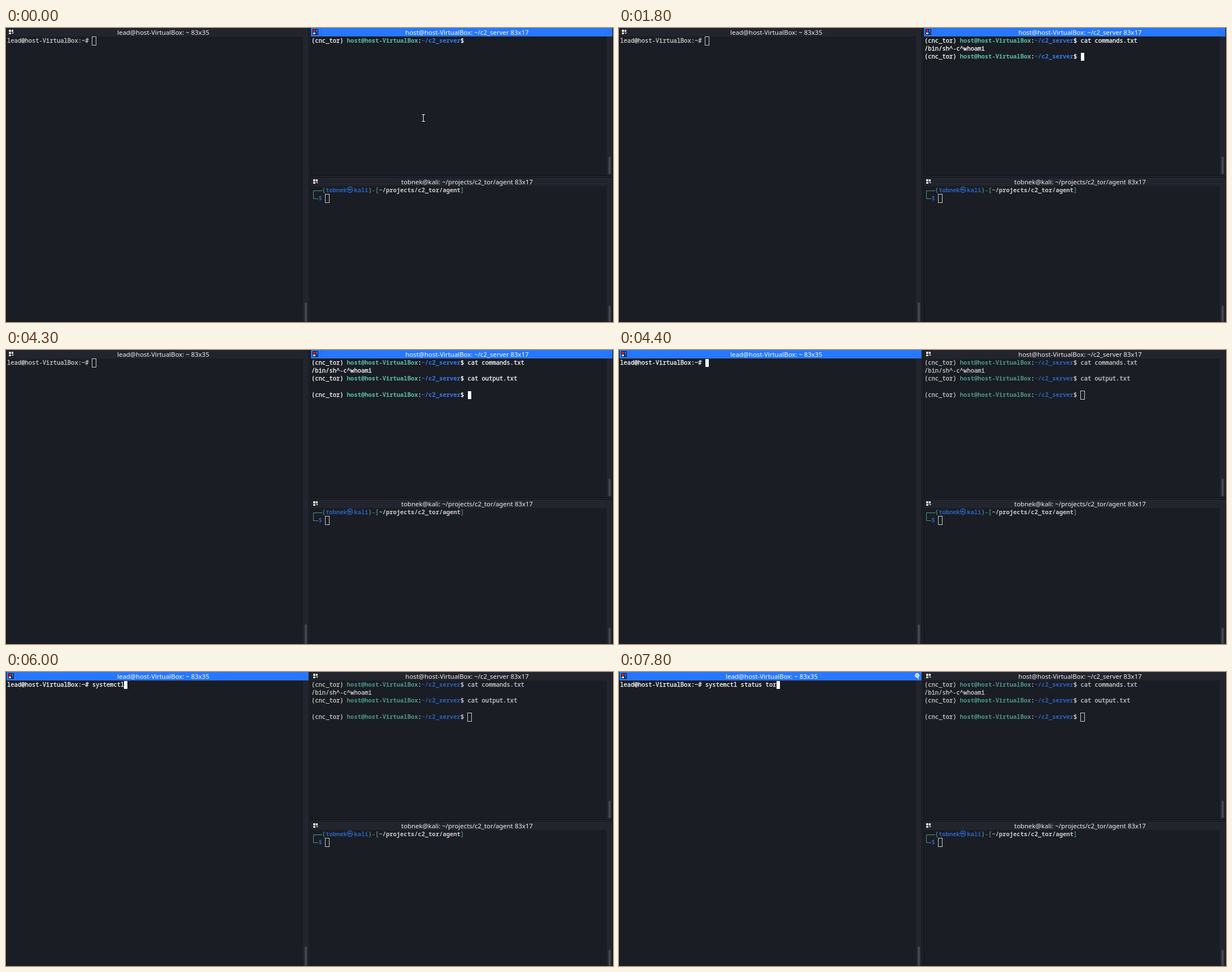
These frames come from a looping animation (1075x521 px, 8 s). An HTML page with a canvas:

```html
<!DOCTYPE html>
<html lang="en">
<head>
<meta charset="utf-8">
<title>Split terminal</title>
<style>
html, body { margin: 0; width: 100%; height: 100%; overflow: hidden; background: #1a1d23; }
canvas { display: block; }
</style>
</head>
<body>
<canvas id="stage" width="1075" height="521"></canvas>
<script>
const ctx = document.getElementById('stage').getContext('2d');
const LOOP = 8000, KEY_DELAY = 100;
const CELL = 6.283, ROW = 14.2;
const MONO = '"Noto Sans Mono", "DejaVu Sans Mono", monospace';
const BG = '#1a1d23', BAR = '#23252e', EDGE = '#101217', ACCENT = '#2777ff';
const BRIGHT = { white: '#ffffff', green: '#5ebdab', blue: '#367bf0' };
const DIM = { white: '#cccccc', green: '#4b9789', blue: '#2b62c0' };

// Text comes in bursts, one character per key delay; pasted text lands at once.
const type = (start, text) => ({ start, text, delay: KEY_DELAY });
const paste = (start, text) => ({ start, text, delay: 0 });
const CAT_COMMANDS = [type(400, 'c'), type(600, 'at '), type(1000, 'com'), paste(1300, 'mands.txt ')];
const CAT_OUTPUT = [type(2300, 'c'), type(2500, 'at'), type(2800, ' '), type(3000, 'out'), paste(3300, 'put.txt ')];
const STATUS = [type(5200, 'systemctl st'), paste(6500, 'at'), type(6700, 'us t'), type(7500, 'or')];

function typed(bursts, t) {
  return bursts.map(({ start, text, delay }) => {
    if (t < start) return '';
    return delay ? text.slice(0, 1 + Math.floor((t - start) / delay)) : text;
  }).join('');
}

function rect(x, y, w, h, color) {
  ctx.fillStyle = color;
  ctx.fillRect(x, y, w, h);
}

function pill(x, y, w, h, color) {
  ctx.fillStyle = color;
  ctx.beginPath();
  ctx.roundRect(x, y, w, h, 2);
  ctx.fill();
}

function line(points, color, width = 1) {
  ctx.strokeStyle = color;
  ctx.lineWidth = width;
  ctx.beginPath();
  points.forEach(([x, y]) => ctx.lineTo(x, y));
  ctx.stroke();
}

// A hairline outline gives regular glyphs a medium weight.
function glyph(ch, x, y, color, thicken) {
  ctx.fillStyle = ctx.strokeStyle = color;
  ctx.fillText(ch, x, y);
  if (!thicken) return;
  ctx.lineWidth = 0.3;
  ctx.strokeText(ch, x, y);
}

// Writes coloured runs on the character grid and returns the next column.
function write(pane, row, runs, col = 0) {
  ctx.textAlign = 'left';
  for (const [text, color = 'white', weight = 500] of runs) {
    ctx.font = `${weight} 10.47px ${MONO}`;
    for (const ch of text) {
      glyph(ch, pane.x + col * CELL, pane.y + row * ROW + 10.3, pane.colors[color], weight < 700);
      col++;
    }
  }
  return col;
}

function cursor(pane, row, col, focused, visible = true) {
  const x = Math.round(pane.x + col * CELL + 0.1);
  const y = Math.round(pane.y + row * ROW + 0.4);
  if (!focused) {
    ctx.strokeStyle = DIM.white;
    ctx.lineWidth = 1;
    ctx.strokeRect(x - 0.5, y - 0.5, 7, 15);
  } else if (visible) {
    rect(x, y, 6, 14, '#ffffff');
  }
}

function groupIcon(x, y, focused) {
  rect(x, y, 10, 10, focused ? '#10131c' : '#17181d');
  rect(x + 1, y + 1, 4, 4, focused ? '#e02020' : '#e4e4e4');
  rect(x + 6, y + 1, 3, 4, focused ? ACCENT : '#e4e4e4');
  rect(x + 1, y + 6, 4, 3, focused ? '#f2f2f2' : '#e4e4e4');
  ctx.fillStyle = focused ? ACCENT : '#c8c8c8';
  ctx.beginPath();
  ctx.moveTo(x + 6, y + 6);
  ctx.lineTo(x + 10, y + 6);
  ctx.lineTo(x + 8, y + 9);
  ctx.fill();
}

function titleBar(x, y, w, title, center, focused) {
  rect(x, y, w, 15, focused ? ACCENT : BAR);
  rect(x + 18, y, 1, 14, focused ? '#236be6' : '#1f2129');
  groupIcon(x + 3, y + 2, focused);
  ctx.font = '11.4px "Noto Sans", "Open Sans", sans-serif';
  ctx.textAlign = 'center';
  ctx.fillStyle = focused ? '#ffffff' : '#f0f0f0';
  ctx.fillText(title, center, y + 11.6);
}

function scrollbar(x, y, h, thumbY, thumbH) {
  rect(x, y, 10, h, BAR);
  pill(x + 3, thumbY, 4, thumbH, '#43464e');
}

function searchIcon() {
  line([[529, 9], [530.5, 12.5]], '#ffffff', 1.6);
  ctx.fillStyle = '#b9cff5';
  ctx.strokeStyle = '#ffffff';
  ctx.lineWidth = 1;
  ctx.beginPath();
  ctx.arc(528, 6, 3.5, 0, Math.PI * 2);
  ctx.fill();
  ctx.stroke();
}

function mousePointer() {
  const left = 736.5, right = 742, middle = 739.2, top = 153.5, bottom = 165.5;
  const beam = [[[left, top], [right, top]], [[middle, top], [middle, bottom]], [[left, bottom], [right, bottom]]];
  beam.forEach(p => line(p, '#000000', 3));
  beam.forEach(p => line(p, '#ffffff', 1.2));
}

function leftPane(t, focused) {
  const pane = { x: 2, y: 15.6, colors: focused ? BRIGHT : DIM };
  const searching = t >= 7800;
  titleBar(1, 0, 535, 'lead@host-VirtualBox: ~ 83x35', searching ? 270.5 : 278.5, focused);
  if (searching) searchIcon();
  scrollbar(526, 15, 506, 486, 35);
  const col = write(pane, 0, [['lead@host-VirtualBox:~# ' + typed(STATUS, t)]]);
  const blinkOff = t >= 5000 && t < 5100;
  cursor(pane, 0, col, focused, !blinkOff);
}

function serverPane(t, focused) {
  const pane = { x: 541, y: 15.6, colors: focused ? BRIGHT : DIM };
  const prompt = [['(cnc_tor) '], ['host@host-VirtualBox', 'green', 700], [':'],
    ['~/c2_server', 'blue', 700], ['$ ']];
  titleBar(540, 0, 534, 'host@host-VirtualBox: ~/c2_server 83x17', 816.5, focused);
  scrollbar(1064, 15, 246, 228, 31);

  let row = 0;
  let col = write(pane, row, [...prompt, [typed(CAT_COMMANDS, t)]]);
  if (t >= 1800) {
    write(pane, 1, [['/bin/sh^-c^whoami']]);
    row = 2;
    col = write(pane, row, [...prompt, [typed(CAT_OUTPUT, t)]]);
  }
  if (t >= 3700) {
    row = 4;
    col = write(pane, row, prompt);
  }
  const blinkOff = t < 400 || (t >= 4200 && t < 4300);
  cursor(pane, row, col, focused, !blinkOff);
}

function agentPane() {
  const pane = { x: 541, y: 280.6, colors: DIM };
  titleBar(540, 265, 534, 'tobnek@kali: ~/projects/c2_tor/agent 83x17', 816.5, false);
  scrollbar(1064, 280, 241, 492, 29);
  line([[560, 288.5], [544.5, 288.5], [544.5, 302.5], [553, 302.5]], DIM.green);
  write(pane, 0, [['(', 'green'], ['tobnek', 'blue', 700]], 3);
  ctx.font = '700 11px "Noto Sans CJK KR", "Noto Sans CJK JP", "Noto Sans CJK", sans-serif';
  ctx.textAlign = 'center';
  glyph('㉿', pane.x + 11 * CELL - 0.8, pane.y + 10.6, DIM.blue, true);
  write(pane, 0, [['kali', 'blue', 700], [')-[', 'green'],
    ['~/projects/c2_tor/agent', 'white', 700], [']', 'green']], 12);
  write(pane, 1, [['$', 'blue', 700]], 2);
  cursor(pane, 1, 4, false);
}

function draw(t) {
  const leftFocused = t >= 4400;
  rect(0, 0, 1075, 521, BG);
  leftPane(t, leftFocused);
  serverPane(t, !leftFocused);
  rect(540, 261, 534, 4, BAR);
  rect(540, 261, 534, 1, EDGE);
  rect(540, 264, 534, 1, EDGE);
  agentPane();
  rect(536, 0, 4, 521, BAR);
  for (const x of [0, 536, 539, 1074]) rect(x, 0, 1, 521, EDGE);
  if (t < 400) mousePointer();
}

const start = performance.now();
function frame() {
  draw((performance.now() - start) % LOOP);
  requestAnimationFrame(frame);
}
frame();
</script>
</body>
</html>
```
